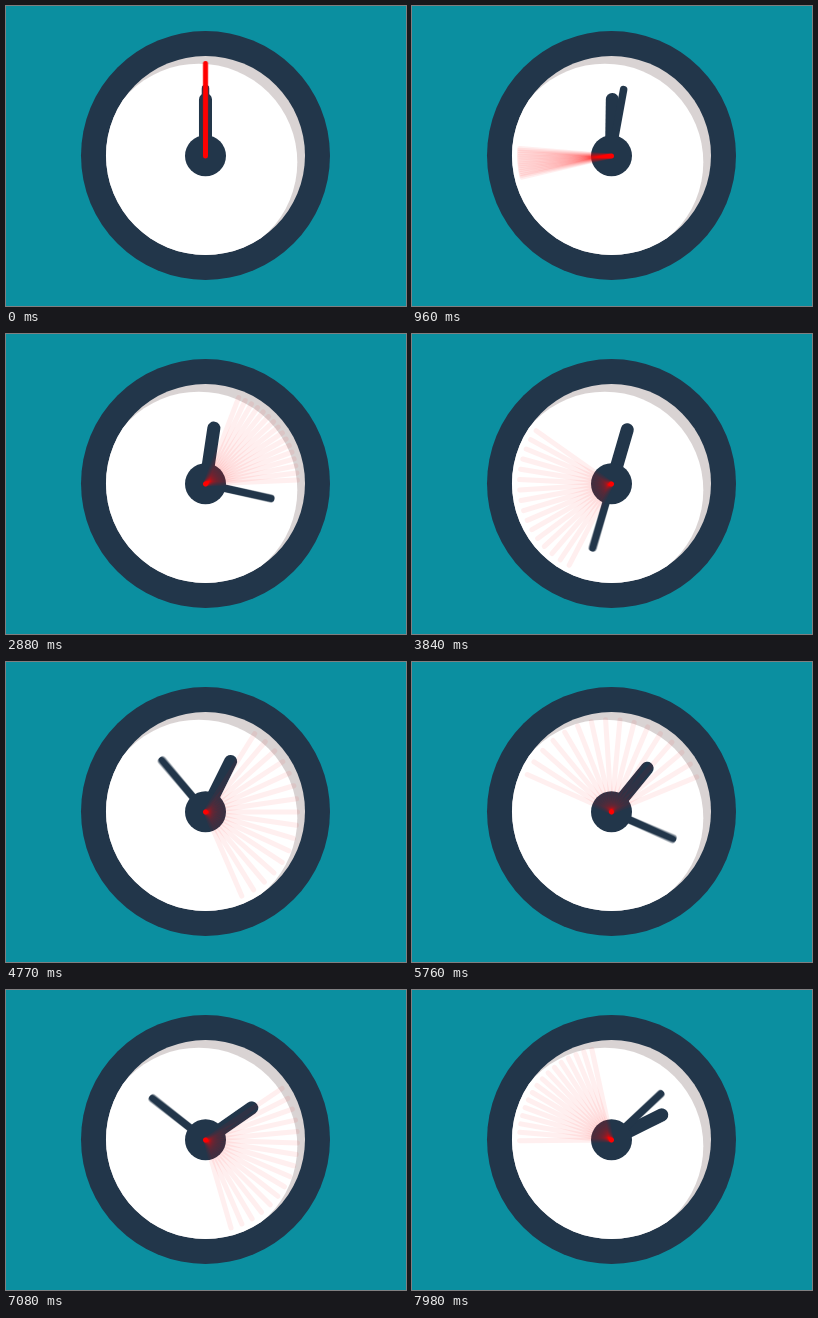
These frames come from a looping animation (400 by 300 pixels, 8000 ms). An HTML page with a canvas:

```html
<!DOCTYPE html>
<html lang="en">
<head>
<meta charset="utf-8">
<title>Racing clock</title>
<style>
  html, body { margin: 0; width: 100%; height: 100%; overflow: hidden; background: #0b8fa0; }
  canvas { display: block; width: 400px; height: 300px; }
</style>
</head>
<body>
<canvas id="stage" width="400" height="300"></canvas>
<script>
const WIDTH = 400, HEIGHT = 300, CX = 199.5, CY = 149.5;
const LOOP = 8000, STEP = 30, SAMPLES = 16, SHUTTER = STEP / 2;
const TEAL = '#0b8fa0', NAVY = '#22364a', SHADE = '#d9d3d3', RED = '#f00';

const ctx = document.getElementById('stage').getContext('2d');
const layer = document.createElement('canvas');
layer.width = WIDTH;
layer.height = HEIGHT;
const blur = layer.getContext('2d');

// Ease in and out along a cubic curve with symmetric handles.
const HANDLE = 0.50167;
function ease(x) {
  let low = 0, high = 1;
  for (let i = 0; i < 40; i++) {
    const s = (low + high) / 2;
    const y = s * s * (3 - 2 * s);
    if (y + 3 * HANDLE * (s - y) < x) low = s; else high = s;
  }
  return low * low * (3 - 2 * low);
}

// Minute hand in degrees; the loop shows only part of the full sweep.
const SWEEP = 901.98, DURATION = 11347.3, LEAD = 58.3;
const START = ease(LEAD / DURATION);
const minuteAngle = ms => SWEEP * (ease((ms + LEAD) / DURATION) - START);

const hands = {
  hour:   { ratio: 1 / 12, length: 56, width: 13, color: NAVY },
  minute: { ratio: 1, length: 67, width: 7.5, color: NAVY },
  second: { ratio: 60, length: 92, width: 5, color: RED }
};

function disc(x, y, radius, color) {
  ctx.fillStyle = color;
  ctx.beginPath();
  ctx.arc(x, y, radius, 0, 2 * Math.PI);
  ctx.fill();
}

// Motion blur: average evenly spaced poses, then tint the result.
function drawHand({ ratio, length, width, color }, angles) {
  blur.globalCompositeOperation = 'source-over';
  blur.clearRect(0, 0, WIDTH, HEIGHT);
  blur.globalCompositeOperation = 'lighter';
  blur.globalAlpha = 16.1 / 255;
  blur.lineCap = 'round';
  blur.lineWidth = width;
  for (const angle of angles) {
    const a = angle * ratio * Math.PI / 180;
    blur.beginPath();
    blur.moveTo(CX, CY + 0.5);
    blur.lineTo(CX + length * Math.sin(a), CY - length * Math.cos(a));
    blur.stroke();
  }
  blur.globalAlpha = 1;
  blur.globalCompositeOperation = 'source-in';
  blur.fillStyle = color;
  blur.fillRect(0, 0, WIDTH, HEIGHT);
  ctx.drawImage(layer, 0, 0);
}

function drawDial() {
  ctx.fillStyle = TEAL;
  ctx.fillRect(0, 0, WIDTH, HEIGHT);
  disc(CX, CY, 124.5, NAVY);
  disc(CX, CY, 99.5, SHADE);
  ctx.save();
  ctx.beginPath();
  ctx.arc(CX, CY, 99.5, 0, 2 * Math.PI);
  ctx.clip();
  disc(CX - 6.7, CY + 6.7, 98.5, '#fff');
  ctx.restore();
}

function draw(ms) {
  const angles = Array.from({ length: SAMPLES }, (_, i) =>
    minuteAngle(ms + ((i + 0.5) / SAMPLES - 0.5) * SHUTTER));
  drawDial();
  drawHand(hands.hour, angles);
  drawHand(hands.minute, angles);
  disc(CX, CY + 0.3, 20.5, NAVY);
  drawHand(hands.second, angles);
}

function tick() {
  const ms = performance.now() % LOOP;
  draw(Math.floor(ms / STEP) * STEP);
  requestAnimationFrame(tick);
}
tick();
</script>
</body>
</html>
```
